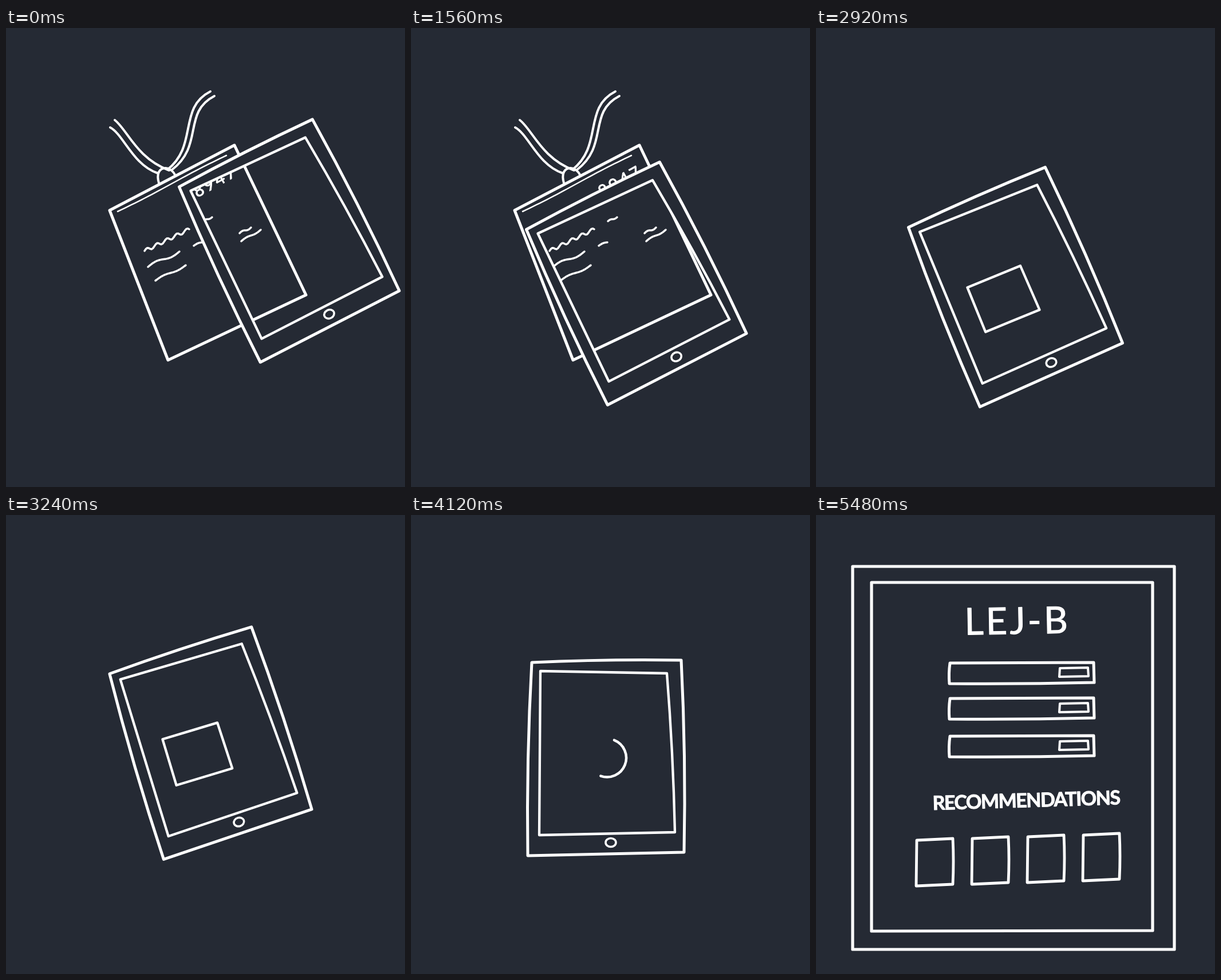
Animation of 697 by 803 pixels, one loop 6920 ms. Source, as an HTML page with a canvas:

```html
<!DOCTYPE html>
<html lang="en">
<head>
<meta charset="utf-8">
<title>Badge scan</title>
<style>
  html, body { margin: 0; width: 100%; height: 100%; overflow: hidden; background: #252a34; }
  canvas { display: block; }
</style>
</head>
<body>
<canvas width="697" height="803"></canvas>
<script>
const ctx = document.querySelector('canvas').getContext('2d');
const INK = '#fff', PAPER = '#252a34';
const LOOP = 6920, TICK = 80;

const parse = text => text.split(' ').map(pair => pair.split(',').map(Number));
const mix = (a, b, p) => a + (b - a) * p;
const between = (a, b, p) => [mix(a[0], b[0], p), mix(a[1], b[1], p)];

// Four corners, clockwise; each side bulges outward by its bow.
function quad(text, bows = [0, 0, 0, 0]) {
  const corners = parse(text), path = new Path2D();
  path.moveTo(...corners[0]);
  corners.forEach((a, i) => {
    const b = corners[(i + 1) % 4], [x, y] = between(a, b, 0.5);
    const dx = b[0] - a[0], dy = b[1] - a[1], k = 2 * bows[i] / Math.hypot(dx, dy);
    path.quadraticCurveTo(x + dy * k, y - dx * k, ...b);
  });
  path.closePath();
  return path;
}

// A line of handwriting: a sine wave from one point to the other.
function scribble(text, waves, height) {
  const [a, b] = parse(text), path = new Path2D();
  for (let s = 0; s <= 1; s += 1 / 32) {
    const [x, y] = between(a, b, s);
    path.lineTo(x, y - height * Math.sin(s * waves * Math.PI * 2));
  }
  return path;
}

function ink(path, width) {
  ctx.lineWidth = width;
  ctx.stroke(path);
}

function at(x, y, degrees, draw) {
  ctx.save();
  ctx.translate(x, y);
  ctx.rotate(degrees * Math.PI / 180);
  draw();
  ctx.restore();
}

function write(text, x, y, degrees, font, spacing, align = 'left') {
  at(x, y, degrees, () => {
    ctx.font = font;
    ctx.letterSpacing = spacing + 'px';
    ctx.textAlign = align;
    ctx.lineWidth = 1;
    ctx.fillText(text, 0, 0);
    ctx.strokeText(text, 0, 0);
  });
}

// Badge
const badgeEdge = quad('181,319 399,205 524,467 283,581');
const badgeRule = scribble('195,321 385,223', 1, -1);
const lanyard = new Path2D(`
  M190,161 C212,178 228,228 285,249
  M182,174 C205,186 222,240 265,254
  M357,111 C300,140 336,205 282,248
  M364,119 C308,148 346,205 290,248
  M267,271 C258,240 288,238 296,259`);
const notes = [
  scribble('242,390 320,352', 4.5, 3),
  scribble('248,418 303,391', 1, 3),
  scribble('261,442 314,415', 1, 2),
  scribble('344,338 360,331', 1, 1),
  scribble('328,381 343,375', 0.5, 1.5),
  scribble('408,359 428,349', 1, 1.5),
  scribble('411,373 445,353', 1, 1.5)
];

function drawBadge() {
  ink(badgeEdge, 5);
  ink(badgeRule, 2.5);
  ink(lanyard, 4);
  notes.forEach(p => ink(p, 3.5));
  write('8947', 334, 297, -29, '29px Lato, sans-serif', 4);
}

// Tablet, drawn upright around its centre
const CENTRE = [341, 425];
const tabletEdge = quad('211,258 472,254 477,590 204,596', [2, 3, 0, 3]);
const screenEdge = quad('226,273 447,277 461,555 224,560', [0, 2, 0, 0]);
const homeButton = new Path2D();
homeButton.ellipse(349, 573, 9, 7.5, 0, 0, Math.PI * 2);
const bezel = new Path2D(tabletEdge);
bezel.addPath(screenEdge);

const scanCorners = parse('265,395 365,396 366,480 264,479');

// Corner brackets; reach 0.5 closes them into a full outline.
function drawScanBox(reach) {
  const path = new Path2D();
  scanCorners.forEach((corner, i) => {
    path.moveTo(...between(corner, scanCorners[(i + 3) % 4], reach));
    path.lineTo(...corner);
    path.lineTo(...between(corner, scanCorners[(i + 1) % 4], reach));
  });
  ink(path, 4.3);
}

function drawSpinner(turn) {
  const path = new Path2D(), start = -1.19 + turn * Math.PI * 2;
  path.arc(342.5, 425, 33.5, start, start + 3.1);
  ink(path, 4.5);
}

function drawTablet({ x, y, angle, scale }, drawContent) {
  at(x, y, angle, () => {
    ctx.scale(scale, scale);
    ctx.translate(-CENTRE[0], -CENTRE[1]);
    ctx.fillStyle = PAPER;
    ctx.fill(bezel, 'evenodd');
    ink(tabletEdge, 5);
    ink(screenEdge, 4.3);
    ink(homeButton, 3.6);
    drawContent();
  });
}

function tabletPose(slide, lift, zoom) {
  if (lift === 1) {
    return { x: mix(341, 349, zoom), y: mix(425, 428, zoom), angle: 0, scale: mix(1, 1.535, zoom) };
  }
  const rise = lift * (1.71 - 0.32 * lift);
  return {
    x: mix(492.5, 341, slide) + 14 * rise,
    y: mix(371, 483, slide) - 85 * rise,
    angle: -26 + 8.6 * rise,
    scale: 1
  };
}

// Large screen
const roughFrame = [
  quad('80,103 612,96 618,780 57,780', [4, 13, 3, 3]),
  quad('111,132 579,132 572,737 110,730', [5, 7, 0, 6])
];
const cleanFrame = [
  quad('64,90 626,90 626,760 64,760'),
  quad('97,118 588,118 588,727 97,728')
];
const bar = quad('234,259 485,258 486,293 233,295', [0, 0, 1, 1]);
const barButton = quad('426,268 475,267 476,282 425,283');
const card = quad('176,569 239,566 239,646 175,649', [0, 1, 0, 0]);

const drawBar = y => at(0, y, 0, () => { ink(bar, 5); ink(barButton, 4); });

const pageParts = [
  () => write('LEJ-B', 352, 208, -1, '65px Lato, sans-serif', 4, 'center'),
  () => drawBar(0),
  () => drawBar(62),
  () => drawBar(128),
  () => write('RECOMMENDATIONS', 204, 516, -1.7, 'bold 34px Lato, sans-serif', -1.5),
  () => { for (let i = 0; i < 4; i++) at(i * 97, i * -3, 0, () => ink(card, 4.8)); }
];

function drawPage(step) {
  (step === 1 ? roughFrame : cleanFrame).forEach(p => ink(p, 5.2));
  pageParts.slice(0, step - 1).forEach(draw => draw());
}

function render(t) {
  const step = start => Math.max(0, Math.min(9, Math.floor((t - start) / TICK) + 1));
  const slide = step(1160), scan = step(2120), lift = step(2840);
  const spin = step(3560), zoom = step(4280), page = step(5000);

  ctx.fillStyle = PAPER;
  ctx.fillRect(0, 0, 697, 803);
  ctx.fillStyle = ctx.strokeStyle = INK;
  ctx.lineCap = ctx.lineJoin = 'round';

  if (page) return drawPage(page);
  if (scan < 8) drawBadge();
  drawTablet(tabletPose(slide / 9, lift / 9, zoom / 9), () => {
    if (scan && !spin) drawScanBox(Math.min(0.5, scan * 0.072));
    if (spin && !zoom) drawSpinner(spin / 8);
  });
}

const began = performance.now();
function frame() {
  render((performance.now() - began) % LOOP);
  requestAnimationFrame(frame);
}
frame();
</script>
</body>
</html>
```
